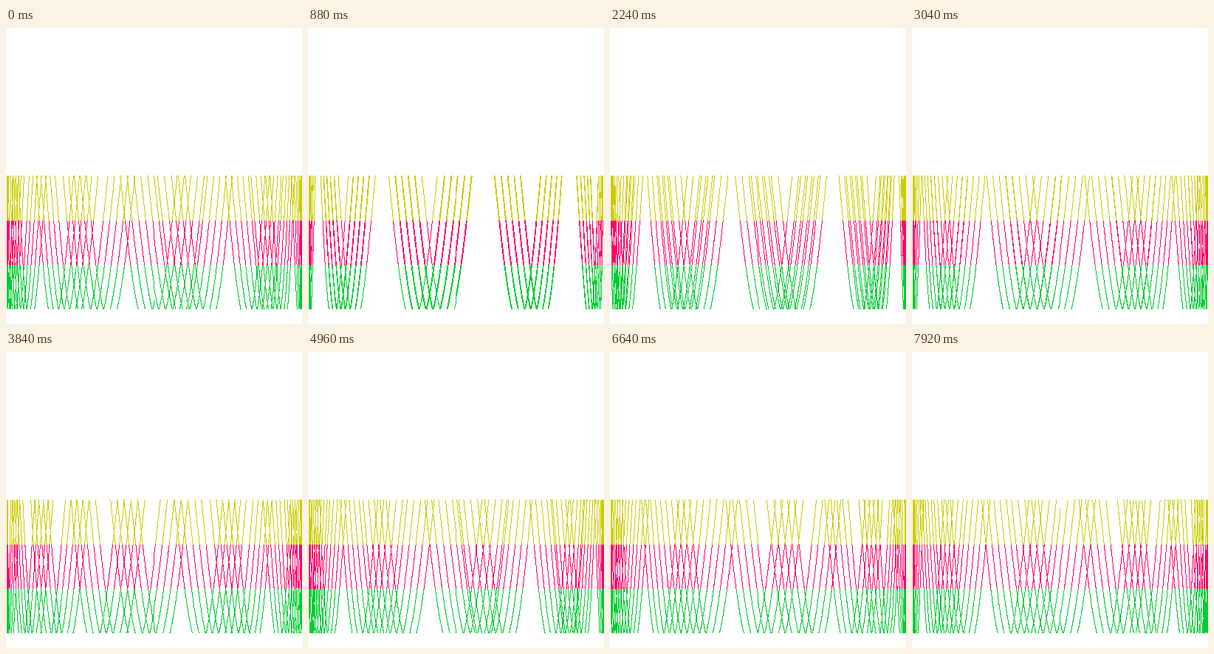
Animation, 401 px wide and 401 px high, one loop 8000 ms. Source, as an HTML page with a canvas:

```html
<!DOCTYPE html>
<html lang="en">
<head>
<meta charset="utf-8">
<title>Lissajous curve</title>
<style>
html, body { margin: 0; width: 100%; height: 100%; overflow: hidden; background: #fff; }
canvas { display: block; }
</style>
</head>
<body>
<canvas id="stage" width="401" height="401"></canvas>
<script>
const ctx = document.getElementById('stage').getContext('2d');
const SIZE = 200;
const CYCLES = 5;
const FREQ = 9.068;
const RES = 0.0005;
const PHASE_STEP = 0.2;
const STEP = 80, LOOP = 8000;
const BAND = 60;
const COLORS = ['#cccc00', '#ff0066', '#00cc33'];

// nearest pixel offset from the centre, truncated toward zero
const offset = v => Math.trunc(v * SIZE + 0.5);

function draw(phase) {
  ctx.fillStyle = '#fff';
  ctx.fillRect(0, 0, 2 * SIZE + 1, 2 * SIZE + 1);
  const bands = COLORS.map(() => []);
  for (let t = 0; t < CYCLES * 2 * Math.PI; t += RES) {
    const y = offset(Math.sin(t * FREQ + phase));
    if (y < 0 || y > BAND * COLORS.length) continue;
    const band = Math.max(0, Math.ceil(y / BAND) - 1);
    bands[band].push([SIZE + offset(Math.sin(t)), SIZE + y]);
  }
  bands.forEach((points, i) => {
    ctx.fillStyle = COLORS[i];
    for (const [x, y] of points) ctx.fillRect(x, y, 1, 1);
  });
}

const began = performance.now();
let shown = -1;

function tick() {
  const step = Math.floor(((performance.now() - began) % LOOP) / STEP);
  if (step !== shown) {
    shown = step;
    draw(step * PHASE_STEP);
  }
  requestAnimationFrame(tick);
}
tick();
</script>
</body>
</html>
```
